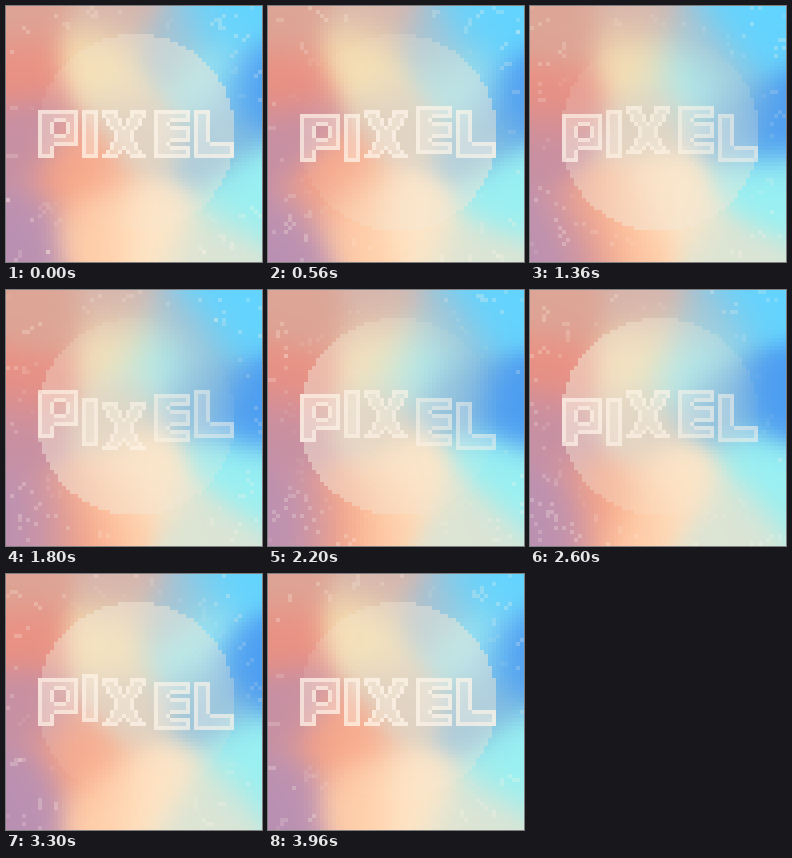
An HTML page with a canvas for the animation above (4 s loop, 256 px wide and 256 px high).

```html
<!DOCTYPE html>
<html lang="en">
<head>
<meta charset="utf-8">
<title>Pixel</title>
<style>
html, body { margin: 0; width: 100%; height: 100%; overflow: hidden; background: #e8c4b0; }
canvas { display: block; width: 100%; height: 100%; image-rendering: pixelated; }
</style>
</head>
<body>
<canvas id="stage" width="64" height="64" aria-label="PIXEL"></canvas>
<script>
const LOOP = 4000, FPS = 30, N = 64, TAU = Math.PI * 2;
const ctx = document.getElementById('stage').getContext('2d');
const image = ctx.createImageData(N, N);
const mix = (a, b, k) => a + (b - a) * k;

// A pool of colour: its home, and how far it drifts by the middle of the loop.
const pool = (hex, x, y, dx = (128 - x) * .1, dy = (128 - y) * .08) => ({
  rgb: [1, 3, 5].map(i => parseInt(hex.slice(i, i + 2), 16)), x, y, dx, dy
});
const pools = [
  pool('#dca596', 22, 12),
  pool('#ea9082', 20, 65, 8, 26),
  pool('#c690a4', 15, 135),
  pool('#ba90b2', 18, 228),
  pool('#f8a282', 68, 170, -4, 50),
  pool('#ffcda8', 100, 220),
  pool('#ffe6c6', 150, 220, -10, -30),
  pool('#d6b4ac', 110, 8),
  pool('#f8e2b0', 105, 56),
  pool('#dccdbc', 130, 115, -20, 10),
  pool('#aac0d0', 175, 35),
  pool('#a0f0f4', 205, 75, -62, 2),
  pool('#88bcdc', 208, 130, -15, -25),
  pool('#62d4ff', 218, 12),
  pool('#4a9cf2', 246, 95, 0, 18),
  pool('#98f0f2', 246, 188),
  pool('#dce4d4', 205, 246)
];

function paintField(turn, ease) {
  const spots = pools.map((p, n) => ({
    rgb: p.rgb,
    x: p.x + p.dx * ease + 5 * Math.sin(turn) * Math.cos(n * 2),
    y: p.y + p.dy * ease + 5 * Math.sin(turn) * Math.sin(n * 2)
  }));
  for (let j = 0; j < N; j++) for (let i = 0; i < N; i++) {
    const x = i * 4 + 2, y = j * 4 + 2;
    const wx = x + 7 * Math.sin(y / 30 + turn), wy = y + 7 * Math.sin(x / 34 - turn);
    const sum = [0, 0, 0];
    let total = 0;
    for (const s of spots) {
      const w = Math.exp(-((wx - s.x) ** 2 + (wy - s.y) ** 2) / 1250);
      total += w;
      for (let c = 0; c < 3; c++) sum[c] += w * s.rgb[c];
    }
    const veil = veilAt(x - 130, y - 127, turn), o = (j * N + i) * 4;
    [242, 232, 216].forEach((tone, c) => { image.data[o + c] = mix(sum[c] / total, tone, veil); });
    image.data[o + 3] = 255;
  }
  ctx.putImageData(image, 0, 0);
}

// The disc is brightest on one side, and that side travels round it.
function veilAt(dx, dy, turn) {
  const dist = Math.hypot(dx, dy);
  if (dist >= 99) return 0;
  return .25 + .24 * Math.cos(Math.atan2(dy, dx) - turn + TAU / 12) * dist / 99;
}

let seed = 11;
const rand = () => (seed = seed * 16807 % 2147483647) / 2147483647;
const sparks = Array.from({ length: 90 }, () => ({
  angle: rand() * TAU, start: rand(), laps: 1 + Math.floor(rand() * 2), length: 1 + Math.floor(rand() * 3)
}));

function paintSparks(phase, ease) {
  for (const s of sparks) {
    const k = (s.start + s.laps * phase) % 1;
    ctx.fillStyle = `rgba(255,244,232,${.25 * Math.sin(Math.PI * k)})`;
    for (let n = 0; n < s.length; n++) {
      const r = 25 + 21 * k + n, a = s.angle + .08 * ease * Math.sin(r);
      ctx.fillRect(Math.floor(32.5 + r * Math.cos(a)), Math.floor(31.7 + r * Math.sin(a)), 1, 1);
    }
  }
}

const inside = (x, y, w, h) => (i, j) => i >= x && i < x + w && j >= y && j < y + h;
const any = (...parts) => (i, j) => parts.some(p => p(i, j));
const stem = inside(0, 0, 4, 12);
const bowl = inside(0, 0, 10, 9), hole = inside(4, 3, 3, 3);
const cross = (i, j) => {
  if (!inside(0, 0, 11, 12)(i, j)) return false;
  const slope = Math.floor(j * 7 / 11);
  return (i >= slope && i < slope + 4) || (i >= 7 - slope && i < 11 - slope);
};
const letters = [
  { x: 8, solid: any(stem, (i, j) => bowl(i, j) && !hole(i, j)) },
  { x: 19, solid: stem },
  { x: 24, solid: cross },
  { x: 37, solid: any(stem, inside(0, 0, 9, 3), inside(0, 4, 9, 4), inside(0, 9, 9, 3)) },
  { x: 47, solid: any(stem, inside(0, 8, 10, 4)) }
];

// A wave runs through the word; it swells and dies away once per loop.
function paintWord(phase, ease) {
  const swell = Math.sin(Math.PI * phase);
  const crest = 18 * phase + swell - 2.2;
  letters.forEach(({ x, solid }, n) => {
    const wave = 1.6 * swell * Math.cos((n - crest) * TAU / letters.length);
    const top = 26 + Math.round(wave + .12);
    const strength = .74 - .34 * ease * x / N;
    for (let j = 0; j < 12; j++) for (let i = 0; i < 11; i++) {
      if (!solid(i, j)) continue;
      const core = solid(i - 1, j) && solid(i + 1, j) && solid(i, j - 1) && solid(i, j + 1);
      ctx.fillStyle = `rgba(255,246,234,${strength * (core ? .45 : 1)})`;
      ctx.fillRect(x + i, top + j, 1, 1);
    }
  });
}

function draw() {
  const steps = LOOP * FPS / 1000;
  const phase = Math.floor((performance.now() - begin) * FPS / 1000) % steps / steps;
  const turn = TAU * phase, ease = (1 - Math.cos(turn)) / 2;
  paintField(turn, ease);
  paintSparks(phase, ease);
  paintWord(phase, ease);
  requestAnimationFrame(draw);
}
const begin = performance.now();
draw();
</script>
</body>
</html>
```
